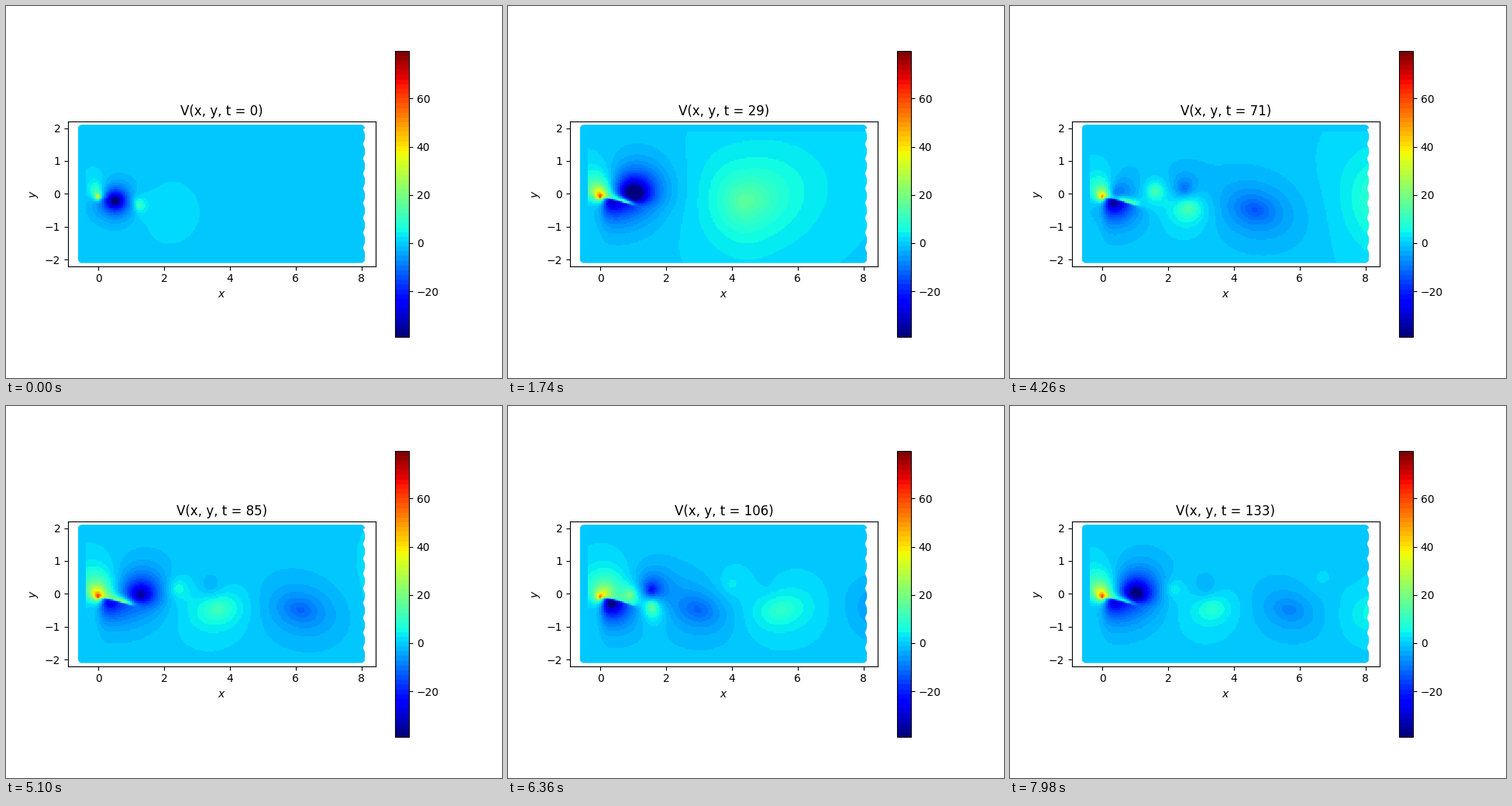
These frames come from a looping animation (640 px wide and 480 px high, 8 s). A matplotlib script:

```python
import numpy as np
import matplotlib.pyplot as plt
from matplotlib.animation import FuncAnimation
from matplotlib.patches import Polygon

STEP_MS = 60      # time between two steps of the flow
TICK_MS = 40
LOOP_MS = 8000
PERIOD = 52       # steps between two shed vortex pairs
FIRST = 30        # step at which the first one leaves the wing
R = 0.123         # marker radius at the rim of the cloud of points
EXTENT = (-0.63, 8.13, -2.13, 2.13)
NX, NY = 248, 121

xs = EXTENT[0] + (np.arange(NX) + 0.5) * (EXTENT[1] - EXTENT[0]) / NX
ys = EXTENT[2] + (np.arange(NY) + 0.5) * (EXTENT[3] - EXTENT[2]) / NY
X, Y = np.meshgrid(xs, ys)

# Soft step across the wing, sharp on the chord and blurred away from it
chord = -0.11 - 0.24 * np.clip(X, 0, 1) ** 1.5
blur = 0.015 + 0.3 * np.maximum(X - 1, 0) + 0.3 * np.maximum(-X, 0)
ABOVE = 0.5 + 0.5 * np.tanh((Y - chord) / (2 * blur))
BELOW = 1 - ABOVE
AFT = 0.5 + 0.5 * np.tanh((X - 0.03) / 0.15)
RIM = (Y > 1.87) | (X < -0.385)


def smooth(p):
    p = min(max(p, 0), 1)
    return p * p * (3 - 2 * p)


def peak(x, y, height, sx, sy, tilt=0, back=1):
    """Hump with an exponential tail, shortened upstream by back."""
    if abs(height) < 0.05:
        return 0
    c, s = np.cos(tilt), np.sin(tilt)
    u = c * (X - x) + s * (Y - y)
    v = c * (Y - y) - s * (X - x)
    u = np.where(u < 0, u / back, u)
    return height * np.exp(0.25 - np.sqrt((u / sx) ** 2 + (v / sy) ** 2 + 0.0625))


def wing(t):
    """Flow bound to the wing, pulsing with the shedding."""
    on = smooth(t / 12)
    beat = np.cos(2 * np.pi * (t - FIRST) / PERIOD)
    tip = peak(-0.02, -0.1, 46, 0.06 + 0.04 * on, 0.06 + 0.04 * on)
    lift = peak(0.04 - 0.1 * beat * on - 0.1 * (1 - on), 0.06,
                17 + (12 + 4 * beat) * on, 0.2 + 0.16 * on, 0.26 + 0.14 * on)
    back_flow = peak(0.73, -0.24, (32 + 26 * beat) * on * (1 - t / 300),
                     0.31, 0.085, tilt=-0.27)
    under = peak(0.32, -0.25, (10 * beat - 35) * on, 0.4, 0.36)
    bound = peak(0.5, -0.2, -46 * np.exp(-t / 10), 0.27, 0.25, tilt=-0.25)
    return tip + (lift + back_flow) * ABOVE + under * BELOW * AFT + bound


def starting_vortex(t):
    grow = smooth(t / 28)
    halo = peak(2.1, -0.55, 2.2 * np.exp(-t / 5), 0.65, 0.65)
    return halo + peak(1.2 + 0.112 * t - 0.0001 * t * t, -0.33 + 0.1 * grow, 16,
                       0.17 + 1.1 * grow, 0.17 + 0.7 * grow, tilt=0.3, back=0.6)


def front_vortex(age, power):
    """Large downwash rolling off the upper side."""
    far = smooth(age / 20)
    fade = np.exp(-max(age, 0) / 7)
    height = 38 * fade + 20 * power * np.exp(-max(age, 0) / 110)
    hump = peak(1.07 + 0.07 * age + 0.0004 * age * age, -0.48 * far,
                -height * smooth((age + 22) / 22),
                0.44 + 0.36 * far, 0.42 + 0.12 * far, tilt=-0.25 * far)
    return hump * (ABOVE + BELOW * (0.4 + 0.6 * far))


def rear_pair(age, power):
    """Upwash from the trailing edge with a weaker pair above it."""
    a = max(age, 0)
    run = 0.052 * age + 0.0004 * age * age
    grow = smooth((age + 18) / 18)
    size = smooth(a / 60)
    up = peak(max(1.4 + run, 1.05), -0.38 - 0.002 * a,
              (28 * np.exp(-a / 8) + 20 * np.exp(-a / 85)) * power * grow,
              0.24 + 0.56 * size, 0.3 + 0.2 * size, tilt=0.18)
    down = peak(1.4 + 0.9 * run, 0.1 + 0.003 * a,
                -48 * np.exp(-a / 16) * power * grow,
                0.3 + 0.1 * size, 0.32 + 0.05 * size)
    small = peak(0.8 + 0.03 * a + 0.0005 * a * a, -0.04 + 0.006 * a,
                 32 * np.exp(-a / 28) * power * grow,
                 0.18 + 0.2 * size, 0.18 + 0.2 * size)
    return up + down + small


def velocity(t):
    v = wing(t) + starting_vortex(t)
    for k in range(3):
        age, power = t - FIRST - k * PERIOD, 0.7 ** k
        v = v + front_vortex(age, power) + rear_pair(age - 21, power)
    return np.where(RIM, 0, v)


def outline():
    """Border of the cloud: round corners and a slightly ragged right side."""
    top = 1.98
    y = np.linspace(-top - R, top + R, 700)
    over = np.maximum(np.abs(y) - top, 0)
    bulge = np.sqrt(np.maximum(R ** 2 - over ** 2, 0))
    notch = 0.05 * np.abs(np.sin(np.pi * y / 0.45 + 0.4)) ** 4
    right = 7.98 + np.where(over > 0, bulge, R - notch)
    return np.concatenate([np.column_stack([-0.5 - bulge, y]),
                           np.column_stack([right, y])[::-1]])


fig, ax = plt.subplots(figsize=(6.4, 4.8), dpi=100)
im = ax.imshow(velocity(0), origin="lower", extent=EXTENT,
               interpolation="nearest", cmap=plt.get_cmap("jet", 60),
               vmin=-39.0, vmax=79.85)
fig.colorbar(im, ax=ax)
ax.set_xlim(-0.925, 8.425)
ax.set_ylim(-2.2, 2.2)
ax.set_xlabel("$x$")
ax.set_ylabel("$y$")
title = ax.set_title("V(x, y, t = 0)")
im.set_clip_path(Polygon(outline(), transform=ax.transData))


def update(i):
    t = (i * TICK_MS + TICK_MS // 2) // STEP_MS
    im.set_data(velocity(t))
    title.set_text(f"V(x, y, t = {t})")
    return im, title


anim = FuncAnimation(fig, update, frames=LOOP_MS // TICK_MS, interval=TICK_MS,
                     repeat=True, repeat_delay=0, blit=False)
plt.show()
```
